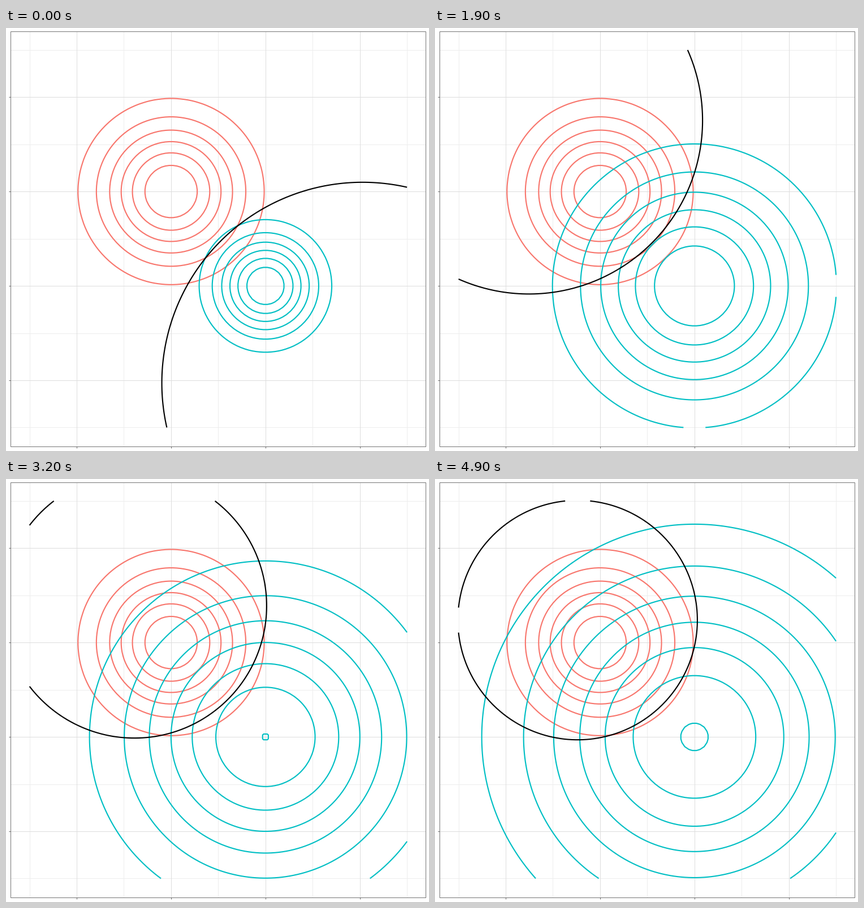
Recreate the animation shown at these times as a matplotlib script. Size 748x748 px, loop 5 s.

```python
import numpy as np
import matplotlib.pyplot as plt
from matplotlib.animation import FuncAnimation
from matplotlib.patches import Rectangle

SIZE, DPI = 748, 100
PX = 72 / DPI  # points per pixel
FRAMES, INTERVAL = 50, 100
LEFT, RIGHT, TOP, BOTTOM = 8.25, 742.5, 5.5, 739.75
LOW, HIGH, PAD = -1.5, 2.5, 0.2
RED, TEAL = "#F8766D", "#00BFC4"
RED_VAR = 0.25
TEAL_VARS = np.linspace(0.1268, 1.3, FRAMES)
BINS = 7

SCALE = (RIGHT - LEFT) / (HIGH - LOW + 2 * PAD)


def to_x(x):
    return LEFT + (x - LOW + PAD) * SCALE


def to_y(y):
    return BOTTOM - (y - LOW + PAD) * SCALE


fig = plt.figure(figsize=(SIZE / DPI, SIZE / DPI), dpi=DPI, facecolor="white")
ax = fig.add_axes([0, 0, 1, 1])
ax.set_xlim(0, SIZE)
ax.set_ylim(SIZE, 0)
ax.axis("off")


def draw_panel():
    for step, color in ((0.5, "#EDEDED"), (1, "#DDDDDD")):
        for v in np.arange(-1.5 if step == 0.5 else -1, 2.6, 1):
            style = dict(color=color, lw=PX, solid_capstyle="butt", zorder=step)
            ax.plot([to_x(v)] * 2, [TOP, BOTTOM], **style)
            ax.plot([LEFT, RIGHT], [to_y(v)] * 2, **style)
    for v in range(-1, 3):
        style = dict(color="#666666", lw=PX, solid_capstyle="butt", zorder=1.5)
        ax.plot([to_x(v)] * 2, [BOTTOM, BOTTOM + 2.75], **style)
        ax.plot([LEFT - 2.75, LEFT], [to_y(v)] * 2, **style)
    ax.add_patch(Rectangle((LEFT, TOP), RIGHT - LEFT, BOTTOM - TOP, fill=False,
                           ec="#757575", lw=PX, zorder=9))


nodes = np.linspace(LOW, HIGH, 101)
gx, gy = np.meshgrid(nodes, nodes)
red_dist = gx**2 + (gy - 1) ** 2
teal_dist = (gx - 1) ** 2 + gy**2


def contour(z, levels, color, zorder):
    lines = ax.contour(to_x(gx), to_y(gy), z, levels=levels, colors=[color],
                       linewidths=2.13 * PX, linestyles="solid", zorder=zorder)
    lines.set_joinstyle("round")
    lines.set_capstyle("butt")
    return lines


def density_rings(dist, var, color, zorder):
    """Equally spaced density levels, relative to the peak."""
    z = np.exp(-dist / (2 * var))
    low = z.min()
    count = BINS if low > 1e-5 else BINS - 1
    levels = np.arange(1, count + 1) * (1 - low) / BINS
    return contour(z, levels, color, zorder)


draw_panel()
density_rings(red_dist, RED_VAR, RED, 3)
moving = []


def update(i):
    while moving:
        moving.pop().remove()
    var = TEAL_VARS[i]
    moving.append(density_rings(teal_dist, var, TEAL, 4))
    # Boundary where both classes are equally likely
    log_ratio = teal_dist / var - red_dist / RED_VAR + 2 * np.log(var / RED_VAR)
    moving.append(contour(log_ratio, [0], "black", 5))
    ax.set_xlim(0, SIZE)
    ax.set_ylim(SIZE, 0)
    return moving


anim = FuncAnimation(fig, update, frames=FRAMES, interval=INTERVAL,
                     init_func=lambda: update(0), repeat=True, repeat_delay=0,
                     blit=False)
plt.show()
```
